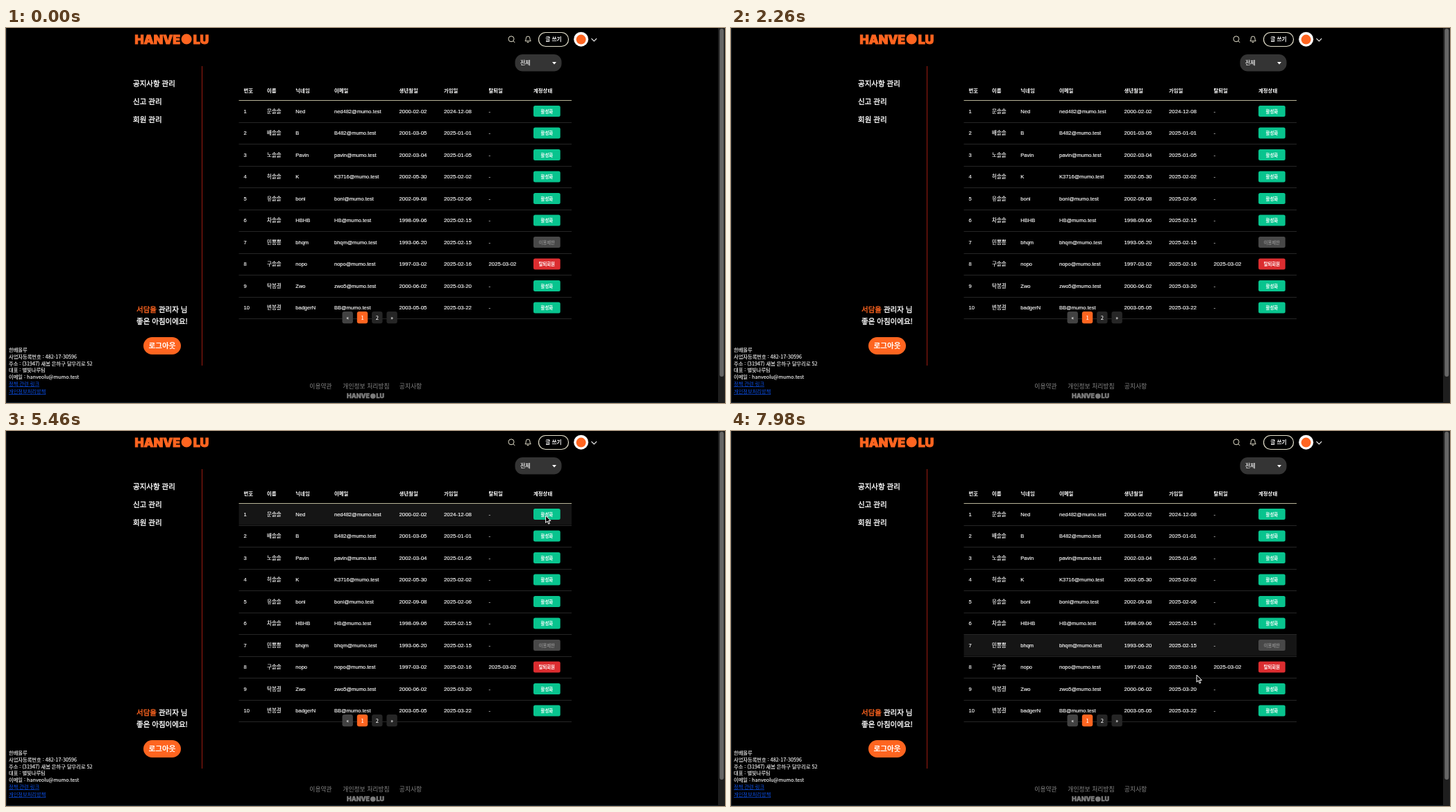
These frames come from a looping animation (1036 by 541 pixels, 8000 ms). An HTML page:

```html
<!DOCTYPE html>
<html lang="ko">
<head>
<meta charset="utf-8">
<title>회원 관리</title>
<style>
  html, body { margin: 0; width: 100%; height: 100%; overflow: hidden; background: #000; }
  svg { display: block; width: 1036px; height: 541px; }
  text { font-family: "Noto Sans CJK KR", "Noto Sans CJK", "Noto Sans", sans-serif; fill: #fff; white-space: pre; }
  .cell { font: 7.5px "Liberation Sans", "Noto Sans CJK KR", sans-serif; stroke: #fff; stroke-width: .15; }
  .date { font-size: 7.8px; }
  .medium { stroke: #fff; stroke-width: .35; }
  .info { stroke: #fff; stroke-width: .12; }
  .logo { font-family: Inter, sans-serif; font-weight: 900; }
</style>
</head>
<body>
<svg id="stage" viewBox="0 0 1036 541"></svg>
<script>
const ORANGE = '#ff6520', CREAM = '#e4e0cc';
const ROW_TOP = 104.5, ROW_HEIGHT = 31.5, LEFT = 335.5, RIGHT = 815;

const columns = [342.5, 376, 417.3, 473, 566.5, 631, 695.5, 760];
const headings = ['번호', '이름', '닉네임', '이메일', '생년월일', '가입일', '탈퇴일', '계정상태'];
const members = [
  ['문솔솔', 'Ned', 'ned482', '2000-02-02', '2024-12-08'],
  ['배솔솔', 'B', 'B482', '2001-03-05', '2025-01-01'],
  ['노솔솔', 'Pavin', 'pavin', '2002-03-04', '2025-01-05'],
  ['허솔솔', 'K', 'K3716', '2002-05-30', '2025-02-02'],
  ['유솔솔', 'boni', 'boni', '2002-09-08', '2025-02-06'],
  ['차솔솔', 'HBHB', 'HB', '1998-09-06', '2025-02-15'],
  ['민뿅뿅', 'bhqm', 'bhqm', '1993-06-20', '2025-02-15', '-', 'limited'],
  ['구솔솔', 'nopo', 'nopo', '1997-03-02', '2025-02-16', '2025-03-02', 'left'],
  ['탁봉결', 'Zwo', 'zwo5', '2000-06-02', '2025-03-20'],
  ['변봉결', 'badgerN', 'BB', '2003-05-05', '2025-03-22']
];
const statuses = {
  active: ['활성화', '#08c48e', '#fff', 700],
  limited: ['이용제한', '#484848', '#a8a8a8', 400],
  left: ['탈퇴회원', '#dc2d30', '#fff', 700]
};

const text = (x, y, size, content, attrs = '') =>
  `<text x="${x}" y="${y}" font-size="${size}" ${attrs}>${content}</text>`;
const centered = (x, y, size, content, attrs = '') =>
  text(x, y, size, content, `text-anchor="middle" ${attrs}`);
const rect = (x, y, w, h, fill, rx = 0, attrs = '') =>
  `<rect x="${x}" y="${y}" width="${w}" height="${h}" rx="${rx}" fill="${fill}" ${attrs}/>`;
const circle = (x, y, r, fill) => `<circle cx="${x}" cy="${y}" r="${r}" fill="${fill}"/>`;
const stroke = (d, color, width = 1) =>
  `<path d="${d}" fill="none" stroke="${color}" stroke-width="${width}"/>`;

function logo(x, y, size, color) {
  const attrs = `class="logo" style="fill:${color};stroke:${color};stroke-width:${size / 18}"`;
  return text(x, y, size, 'HANVE', attrs) +
    circle(x + size * 4.24, y - size * .38, size * .43, color) +
    text(x + size * 4.78, y, size, 'LU', attrs);
}

function header() {
  return logo(185.5, 22.7, 17.6, ORANGE) +
    stroke('M732 15.8a4 4 0 1 1-8 0a4 4 0 1 1 8 0M731 18.8l2.3 2.3', CREAM) +
    stroke('M748 18.8q1.5-1.5 1.3-4a2.8 2.8 0 0 1 5.6 0q-.2 2.5 1.3 4zM750.6 20.6h2.8', CREAM) +
    rect(767.5, 6.5, 43, 20, 'none', 10, `stroke="${CREAM}" stroke-width="1.2"`) +
    centered(789, 19.4, 7.7, '글 쓰기', 'font-weight="700"') +
    circle(828.6, 16.2, 10.5, '#fff') + circle(828.6, 16.6, 7, ORANGE) +
    stroke('M843.5 15.2l3.8 3.8l3.8-3.8', '#eee', 1.2) +
    rect(733.5, 38, 67, 24.5, '#343434', 11) +
    text(741, 53.2, 8, '전체', 'class="info"') +
    '<path d="M787 49h6l-3 3.4z" fill="#fff"/>';
}

function sidebar() {
  const medium = 'class="medium"';
  const menu = ['공지사항 관리', '신고 관리', '회원 관리']
    .map((label, i) => text(183, 84.3 + i * 26, 10.5, label, medium)).join('');
  return menu + rect(282, 55, 1, 432, '#9c1c10') +
    text(188, 409.6, 10.5, `<tspan fill="${ORANGE}" stroke="${ORANGE}">서담율</tspan> 관리자 님`, medium) +
    text(188, 427.2, 10.5, '좋은 아침이에요!', medium) +
    rect(198, 446, 54, 25, ORANGE, 12.5) +
    centered(225, 462.2, 10.6, '로그아웃', 'font-weight="700"');
}

function memberRow([name, nick, mail, birth, joined, left = '-', status = 'active'], i) {
  const y = ROW_TOP + ROW_HEIGHT * i + 15.6;
  const values = [i + 1, name, nick, mail + '@mumo.test', birth, joined, left];
  const [label, fill, color, weight] = statuses[status];
  return values.map((value, c) =>
      text(columns[c], y + 2.7, 7.5, value, `class="cell${c > 3 ? ' date' : ''}"`)).join('') +
    rect(LEFT, Math.round(y + 15.4), RIGHT - LEFT, 1, '#262626') +
    rect(760, y - 8, 38.7, 16, fill, 2.5) +
    centered(779.3, y + 2.5, 6.3, label, `font-weight="${weight}" style="fill:${color}"`);
}

function table() {
  return headings.map((label, c) => text(columns[c], 92.8, 7.4, label, 'font-weight="700"')).join('') +
    rect(LEFT, 104, RIGHT - LEFT, 1, '#b8b498') +
    members.map(memberRow).join('') +
    ['«', '1', '2', '»'].map((label, i) => {
      const x = 492.2 + i * 21.3;
      return rect(x - 7.7, 409, 15.4, 17.3, ['#424242', ORANGE, '#262626', '#262626'][i], 3) +
        centered(x, 420.5, 7.5, label, 'class="info"');
    }).join('');
}

function footer() {
  const info = ['한베올루', '사업자등록번호 : 482-17-30596', '주소 : (31947) 새봄 은하구 달무리로 52',
    '대표 : 별빛나루팀', '이메일 : hanveolu@mumo.test'];
  const link = 'style="fill:#0c50e8" text-decoration="underline"';
  const gray = 'style="fill:#858585"';
  return info.map((line, i) => text(4, 467.3 + i * 9.6, 7.25, line, 'class="info"')).join('') +
    text(4, 516.2, 7.25, '정책 관련 링크', link) +
    text(4, 527.3, 7.25, '개인정보처리방책', link) +
    text(437.3, 520.3, 8.8, '이용약관', gray) +
    text(485.3, 520.3, 8.8, '개인정보 처리방침', gray) +
    text(566.8, 520.3, 8.8, '공지사항', gray) +
    logo(491, 534.4, 8.9, '#7c7c7c');
}

const frame = rect(0, 0, 1, 541, '#1c222a') + rect(0, 540, 1036, 1, '#1c2a36') +
  rect(1026, 0, 10, 541, '#1e1e1e') + rect(1028.3, 1, 6, 502, '#666', 3);

document.getElementById('stage').innerHTML = rect(0, 0, 1036, 541, '#000') +
  rect(LEFT, 0, RIGHT - LEFT, ROW_HEIGHT - 1, '#151515', 0, 'id="hover"') +
  header() + sidebar() + table() + footer() + frame +
  `<path id="cursor" d="M0 0V10.2L2.4 8L4.1 12L5.8 11.3L4.1 7.5H7.3Z"
    fill="#000" stroke="#fff" stroke-width="1" stroke-linejoin="round"/>`;

const hover = document.getElementById('hover');
const cursor = document.getElementById('cursor');

// Pointer path: time in ms, x, y
const path = [[3000, 1040, 98], [3340, 979, 107], [4080, 868, 118.5], [4500, 844, 121.5],
  [5300, 778, 122], [6180, 776, 122.5], [7300, 772, 123.5], [7560, 771, 126], [7980, 671, 352]];

function pointerAt(time) {
  if (time < path[0][0]) return null;
  const next = path.findIndex(point => point[0] > time);
  if (next < 0) return path[path.length - 1].slice(1);
  const [t0, x0, y0] = path[next - 1], [t1, x1, y1] = path[next];
  const k = (time - t0) / (t1 - t0);
  return [x0 + (x1 - x0) * k, y0 + (y1 - y0) * k];
}

function draw(time) {
  const pointer = pointerAt(time);
  cursor.style.display = pointer ? '' : 'none';
  if (pointer) cursor.setAttribute('transform', `translate(${pointer})`);

  // Row highlight trails slightly behind the pointer
  const trail = pointerAt(time - 60);
  const inTable = trail && trail[0] > LEFT && trail[0] < RIGHT;
  hover.style.display = inTable ? '' : 'none';
  if (inTable) {
    const row = Math.floor((trail[1] - ROW_TOP) / ROW_HEIGHT);
    hover.setAttribute('y', ROW_TOP + row * ROW_HEIGHT + .5);
  }
}

const start = performance.now();
function tick() {
  draw((performance.now() - start) % 8000);
  requestAnimationFrame(tick);
}
tick();
</script>
</body>
</html>
```
